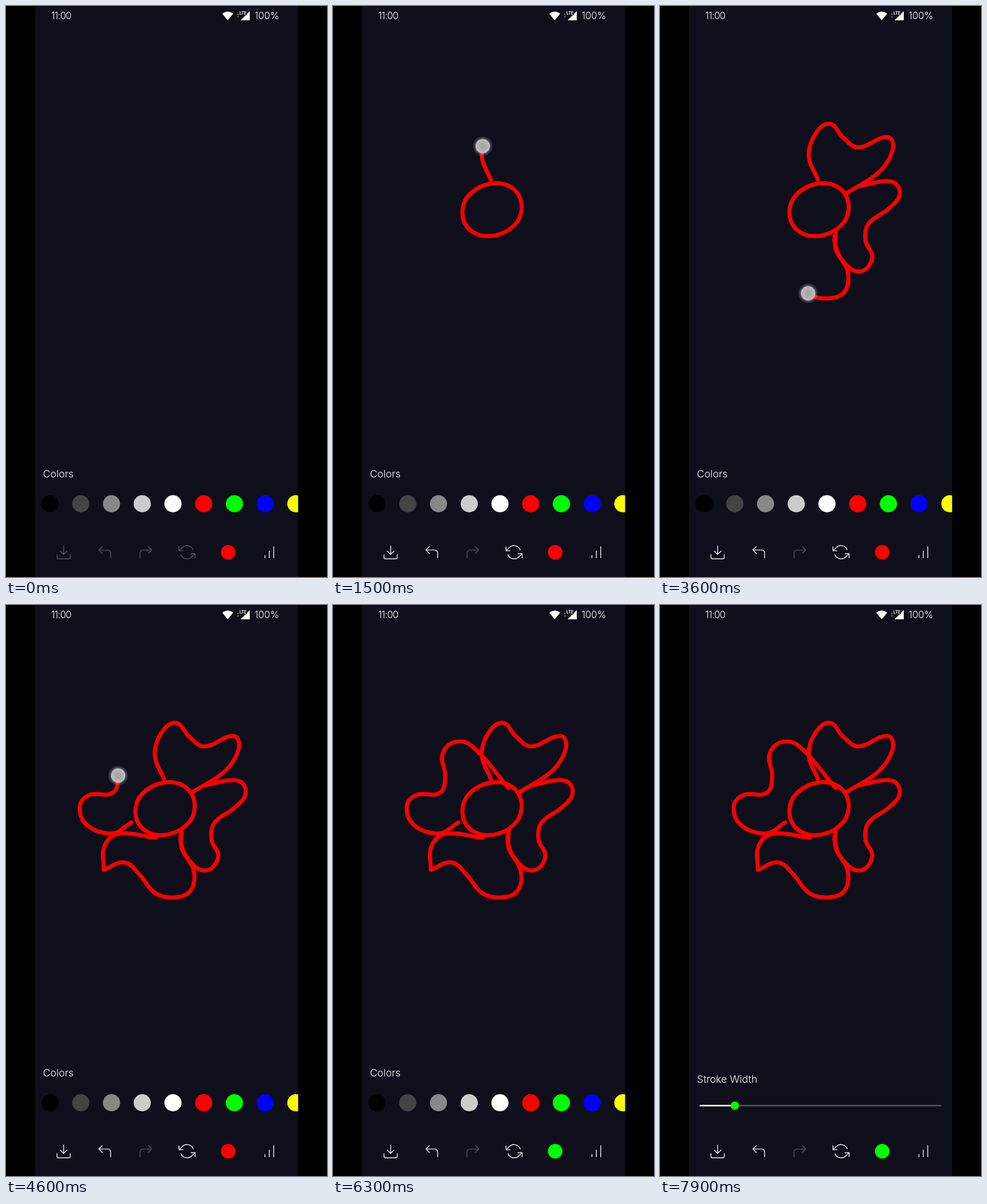
These frames come from a looping animation (561 px wide and 998 px high, 8 s). An HTML page:

```html
<!DOCTYPE html>
<html lang="en">
<head>
<meta charset="utf-8">
<title>Drawing pad</title>
<style>
  html, body { margin: 0; height: 100%; overflow: hidden; background: #000; }
  svg { display: block; width: 100vw; height: 100vh; }
  text { font: 300 17.8px Inter, Roboto, sans-serif; fill: #fff; }
  .status text { font-size: 16.7px; }
  #ink path { fill: none; stroke: #f00; stroke-width: 7; stroke-linecap: round; stroke-linejoin: round; }
  #icons path { fill: none; stroke: #f2f2f4; stroke-width: 1.1; }
  #icons .dim { stroke: #54555d; }
</style>
</head>
<body>
<svg viewBox="0 0 561 998" preserveAspectRatio="none">
  <defs>
    <clipPath id="screen"><rect x="50.5" width="460" height="998"/></clipPath>
    <radialGradient id="glow">
      <stop offset=".65" stop-color="#b9b9c4" stop-opacity=".5"/>
      <stop offset="1" stop-color="#b9b9c4" stop-opacity="0"/>
    </radialGradient>
    <radialGradient id="pad">
      <stop offset=".3" stop-color="#a9a9ac"/>
      <stop offset="1" stop-color="#c3c3c8"/>
    </radialGradient>
  </defs>
  <g clip-path="url(#screen)">
    <rect width="561" height="998" fill="#0e0f1a"/>
    <g class="status">
      <text x="79" y="23" letter-spacing="-.7">11:00</text>
      <text x="434.5" y="23">100%</text>
      <path d="M378 13.5Q387.5 6 397 13.5L387.5 25Z" fill="#fff"/>
      <path d="M410 25H426V9Z" fill="#fff"/>
      <path d="M403 16l2.3-3 2.3 3zM403 18l2.3 3 2.3-3z" fill="#666"/>
      <text x="408" y="15" style="font-size:7px;font-weight:700;stroke:#0e0f1a;stroke-width:2px;paint-order:stroke">LTE</text>
    </g>
    <g id="ink"></g>
    <g id="colors"><text x="64.5" y="824">Colors</text></g>
    <g id="width">
      <text x="64.5" y="835">Stroke Width</text>
      <path d="M69.5 875H491.5" stroke="#55565e" stroke-width="2.5"/>
      <path d="M69.5 875H131" stroke="#fff" stroke-width="2.5"/>
      <circle cx="130.8" cy="875" r="7.3" fill="#0f0"/>
    </g>
    <g id="icons"></g>
    <circle id="current" cx="388.3" cy="954.7" r="12.7"/>
    <g id="touch">
      <circle r="18" fill="url(#glow)"/>
      <circle r="12.5" fill="url(#pad)" fill-opacity=".95"/>
    </g>
  </g>
</svg>
<script>
const $ = id => document.getElementById(id);
const LOOP = 8000, STEP = 100, LAG = 14;
const ramp = (t, a, b) => Math.min(1, Math.max(0, (t - a) / (b - a)));

function add(parent, name, attrs) {
  const el = document.createElementNS("http://www.w3.org/2000/svg", name);
  for (const key in attrs) el.setAttribute(key, attrs[key]);
  return parent.appendChild(el);
}

// Smooth curve through "x,y x,y ..."; a repeated point makes a corner
function curve(text) {
  const p = text.split(" ").map(s => s.split(",").map(Number));
  const handle = (i, side, size) => {
    const a = p[i - 1] || p[i], b = p[i + 1] || p[i];
    const k = side * .36 * size / Math.hypot(b[0] - a[0], b[1] - a[1]);
    return [p[i][0] + k * (b[0] - a[0]), p[i][1] + k * (b[1] - a[1])];
  };
  let d = "M" + p[0];
  for (let i = 1; i < p.length; i++) {
    const size = Math.hypot(p[i][0] - p[i - 1][0], p[i][1] - p[i - 1][1]);
    d += `C${handle(i - 1, 1, size)} ${handle(i, -1, size)} ${p[i]}`;
  }
  return d;
}

["#000", "#444", "#888", "#ccc", "#fff", "#f00", "#0f0", "#00f", "#ff0"].forEach((fill, i) =>
  add($("colors"), "circle", { cx: 77 + 53.7 * i, cy: 870, r: 15, fill }));

// Toolbar icons on a 24-unit grid; the fifth slot holds the current colour
const icons = [
  "M21 15v4a2 2 0 0 1-2 2H5a2 2 0 0 1-2-2v-4M7 10l5 5 5-5M12 15V3",
  "M9 14L4 9l5-5M20 20v-7a4 4 0 0 0-4-4H4",
  "M15 14l5-5-5-5M4 20v-7a4 4 0 0 1 4-4h12",
  "M1 4v6h6M23 20v-6h-6M20.5 9A9 9 0 0 0 5.6 5.6L1 10M23 14l-4.6 4.4A9 9 0 0 1 3.5 15",
  "",
  "M6 20v-4M12 20V10M18 20V4"
].map((d, i) => add($("icons"), "path", {
  d, transform: `translate(${100.7 + 71.9 * i} 954.7) scale(1.28) translate(-12 -12)`
}));
icons[2].classList.add("dim");

// Centre and four petals, one every 900 ms
const strokes = [
  { d: "M233 336A57 47-33 0 0 323 376A57 47-33 0 0 233 336" },
  { pace: .93, d: curve("276,304 260,262 272,223 297,206 319,229 346,247 398,229 407,250 383,290 326,327") },
  { pace: 1.21, d: curve("348,315 405,307 419,328 401,353 364,381 359,410 371,440 349,464 319,445 305,412 307,395") },
  { pace: 1.59, d: curve("307,397 307,425 328,464 322,500 291,511 260,503 234,472 207,450 171,463 171,463 172,422 196,400 262,407") },
  { pace: 1.08, span: 900, d: curve("219,380 186,399 142,385 129,352 146,332 187,328 196,298 191,262 211,240 242,246 307,320") }
].map(({ d, pace = 1, span = 700 }, i) => {
  const path = add($("ink"), "path", { d }), start = 500 + 900 * i;
  return { path, pace, start, end: start + span, lift: start + span + STEP, length: path.getTotalLength() };
});

const taps = [
  { from: 5700, to: 6100, at: [399, 870] },
  { from: 6900, to: 7100, at: [388, 955] },
  { from: 7500, to: 7700, at: [460, 955] }
];

function slide(panel, hidden) {
  panel.setAttribute("transform", `translate(0 ${128 * hidden})`);
  panel.setAttribute("opacity", 1 - hidden);
}

function draw(t) {
  let finger = taps.find(({ from, to }) => t >= from && t < to)?.at;
  for (const { path, pace, start, end, lift, length } of strokes) {
    const reach = length * ramp(t, start, end) ** pace;
    const drawn = t >= lift ? length : Math.max(0, reach - LAG);
    path.style.display = drawn ? "" : "none";
    path.style.strokeDasharray = t >= lift ? "none" : `${drawn} ${length + 20}`;
    if (t >= start && t < lift) {
      const { x, y } = path.getPointAtLength(reach);
      finger = [x, y];
    }
  }
  $("touch").style.display = finger ? "" : "none";
  if (finger) $("touch").setAttribute("transform", `translate(${finger})`);

  for (const i of [0, 1, 3]) icons[i].classList.toggle("dim", t < 1200);
  $("current").setAttribute("fill", t < 6000 ? "#f00" : "#0f0");
  slide($("colors"), ramp(t, 6900, 7200));
  slide($("width"), 1 - ramp(t, 7500, 7900));
}

const origin = performance.now();
function frame() {
  const t = (performance.now() - origin) % LOOP;
  draw(Math.floor(t / STEP) * STEP);
  requestAnimationFrame(frame);
}
frame();
</script>
</body>
</html>
```
